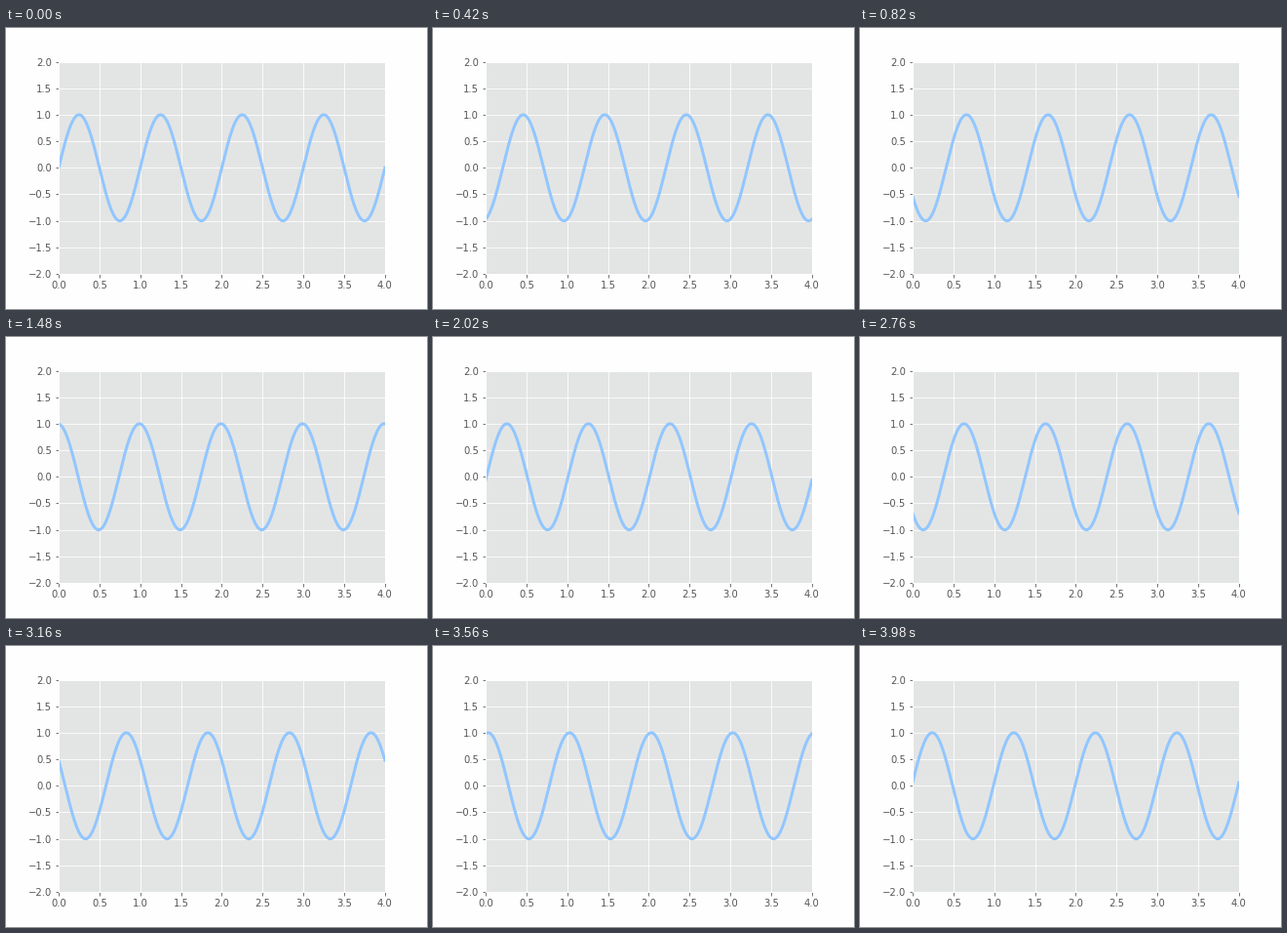
A matplotlib script that plays this animation: 432 by 288 pixels, repeating every 4000 ms.

```python
import numpy as np
import matplotlib.pyplot as plt
from matplotlib.animation import FuncAnimation

FRAMES = 200
INTERVAL = 20  # ms
SHIFT = 0.01   # distance the wave moves right per frame

plt.style.use("ggplot")
plt.rcParams.update({
    "font.family": "DejaVu Sans",
    "font.size": 10,
    "figure.facecolor": "#fefefe",
    "axes.facecolor": "#e3e5e4",
})

fig = plt.figure(figsize=(6, 4), dpi=72)
fig.subplots_adjust(left=0.125, right=0.9, bottom=0.125, top=0.88)
ax = fig.add_subplot(xlim=(0, 4), ylim=(-2, 2))
ax.set_xticks(np.arange(0, 4.1, 0.5))
ax.set_yticks(np.arange(-2, 2.1, 0.5))

x = np.linspace(0, 4, 1000)
wave, = ax.plot([], [], color="#92c6ff", lw=3)


def init():
    wave.set_data([], [])
    return wave,


def update(i):
    wave.set_data(x, np.sin(2 * np.pi * (x - SHIFT * i)))
    return wave,


anim = FuncAnimation(fig, update, init_func=init, frames=FRAMES,
                     interval=INTERVAL, repeat=True, repeat_delay=0, blit=True)

plt.show()
```
